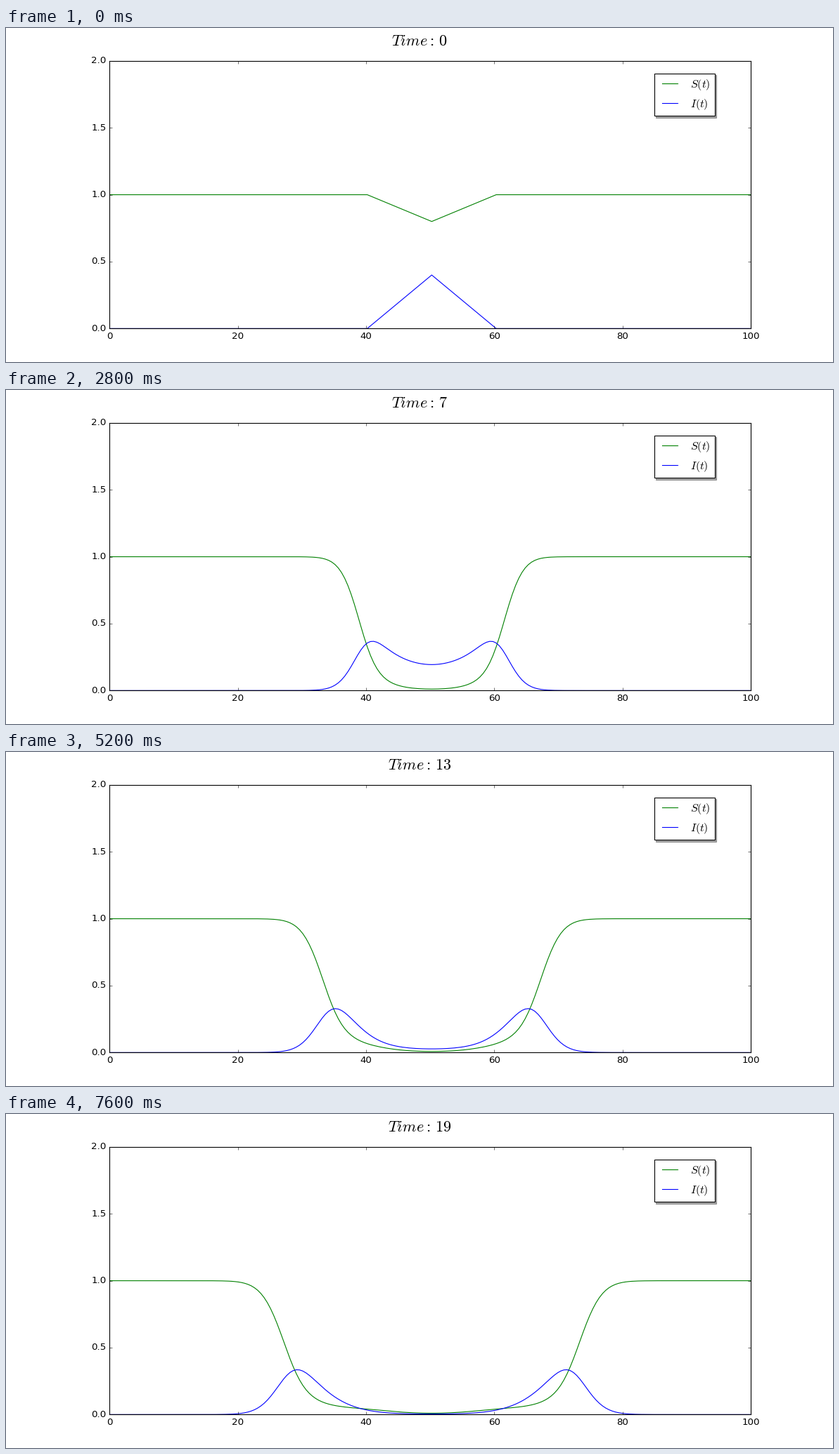
Recreate the animation shown at these times as a matplotlib script. Size 1176x476 px, loop 8000 ms.

```python
import matplotlib.pyplot as plt
import numpy as np
from matplotlib.animation import FuncAnimation

plt.style.use("classic")
plt.rcParams.update({
    "figure.facecolor": "white",
    "figure.dpi": 80,
    "savefig.dpi": "figure",
})

W, H, DPI = 1176, 476, 80
STEPS, INTERVAL = 20, 400

# Layout in pixels, measured from the bottom left
LEFT, RIGHT, BOTTOM, TOP = 147.1, 1059.1, 47.7, 429.1
LEGEND_LEFT, LEGEND_TOP = 921.7, 411.4
TITLE_X, TITLE_TOP = 588.4, 467.3

# Diffusive epidemic model: infection, recovery, diffusion
BETA, GAMMA, DIFF, DT = 1.0, 0.3, 0.5, 1.0
N = 200
x = np.linspace(0, 100, N)


def diffusion_operator():
    """Inverse of one implicit diffusion step with closed ends."""
    k = DIFF * DT / (x[1] - x[0]) ** 2
    lap = np.eye(N, k=1) + np.eye(N, k=-1) - 2 * np.eye(N)
    lap[0, 0] = lap[-1, -1] = -1
    return np.linalg.inv(np.eye(N) - k * lap)


def simulate():
    spread = diffusion_operator()
    bump = np.clip(1 - np.abs(np.arange(N) - N // 2) / 20, 0, None)
    s, i = 1 - 0.2 * bump, 0.4 * bump
    states = [(s, i)]
    for _ in range(STEPS - 1):
        new = BETA * s * i
        s, i = spread @ (s - DT * new), spread @ (i + DT * (new - GAMMA * i))
        states.append((s, i))
    return states


states = simulate()

fig = plt.figure(figsize=(W / DPI, H / DPI), dpi=DPI)
ax = fig.add_axes([LEFT / W, BOTTOM / H, (RIGHT - LEFT) / W, (TOP - BOTTOM) / H])
ax.set_xlim(0, 100)
ax.set_ylim(0, 2)
ax.set_xticks(range(0, 101, 20))
ax.set_yticks(np.arange(0, 2.1, 0.5))

s_line, = ax.plot(x, states[0][0], "g", label="$S(t)$")
i_line, = ax.plot(x, states[0][1], "b", label="$I(t)$")
ax.legend(loc="upper left", bbox_to_anchor=(LEGEND_LEFT / W, LEGEND_TOP / H),
          bbox_transform=fig.transFigure, borderaxespad=0, shadow=True)
title = fig.suptitle("", x=TITLE_X / W, y=TITLE_TOP / H, fontsize=20)


def draw(t):
    s, i = states[t]
    s_line.set_ydata(s)
    i_line.set_ydata(i)
    title.set_text(rf"$Time:\,{t}$")
    return s_line, i_line, title


anim = FuncAnimation(fig, draw, frames=STEPS, interval=INTERVAL,
                     repeat=True, repeat_delay=0)
plt.show()
```
